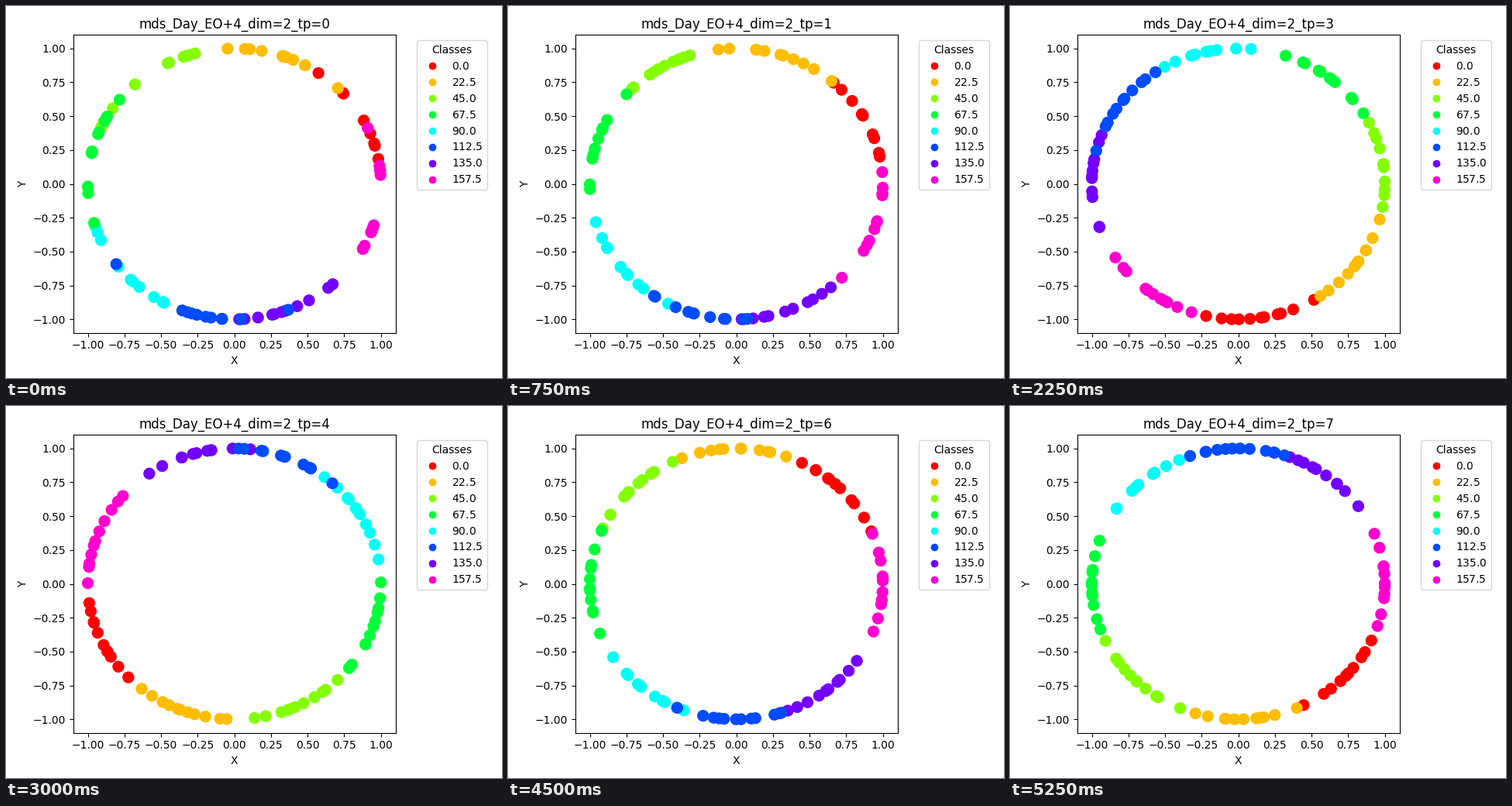
Write a matplotlib script that moves like this. It is 640 px wide and 480 px high and loops after 6 s.

```python
import numpy as np
import matplotlib.pyplot as plt
from matplotlib.animation import FuncAnimation

CLASSES = np.arange(8) * 22.5
CENTRES = np.array([0, 45, 91, 135, 187, 225, 260, 315])  # round the ring, degrees
DRAW_ORDER = [6, 0, 1, 2, 4, 3, 5, 7]
PER_CLASS = 11

# Each time point turns the whole ring: angle of the first class, sense of rotation.
TURNS = [(30, 1), (30, 1), (208, 1), (278, 1), (205, 1), (45, 1), (45, 1), (-44, -1)]

# The first embedding is the least ordered one.
NOISE = [15, 6, 2, 2, 2, 2, 2, 2]

LABELS = np.repeat(CLASSES[DRAW_ORDER], PER_CLASS)


def ring(tp):
    """Points on the unit circle, clustered by class and denser mid-cluster."""
    rng = np.random.default_rng(tp)
    first, sense = TURNS[tp]
    u = np.linspace(-1, 1, PER_CLASS)
    cluster = 20 * (0.65 * u + 0.35 * u**3)
    angles = CENTRES[DRAW_ORDER, None] + cluster
    angles = angles + rng.normal(0, NOISE[tp], angles.shape)
    theta = np.radians(first + sense * angles).ravel()
    return np.column_stack([np.cos(theta), np.sin(theta)])


def update(tp):
    dots.set_offsets(ring(tp))
    ax.set_title(f"mds_Day_EO+4_dim=2_tp={tp}")
    return [dots]


fig, ax = plt.subplots(figsize=(6.4, 4.8), dpi=100)
dots = ax.scatter(*ring(0).T, c=LABELS, cmap="hsv", vmin=0, vmax=180, s=100)
ax.set(xlabel="X", ylabel="Y", xlim=(-1.1, 1.1), ylim=(-1.1, 1.1))
ax.legend(*dots.legend_elements(), title="Classes",
          bbox_to_anchor=(1.05, 1), loc="upper left")
update(0)
fig.tight_layout()

anim = FuncAnimation(fig, update, frames=len(TURNS), interval=750,
                     repeat=True, repeat_delay=0)
plt.show()
```
